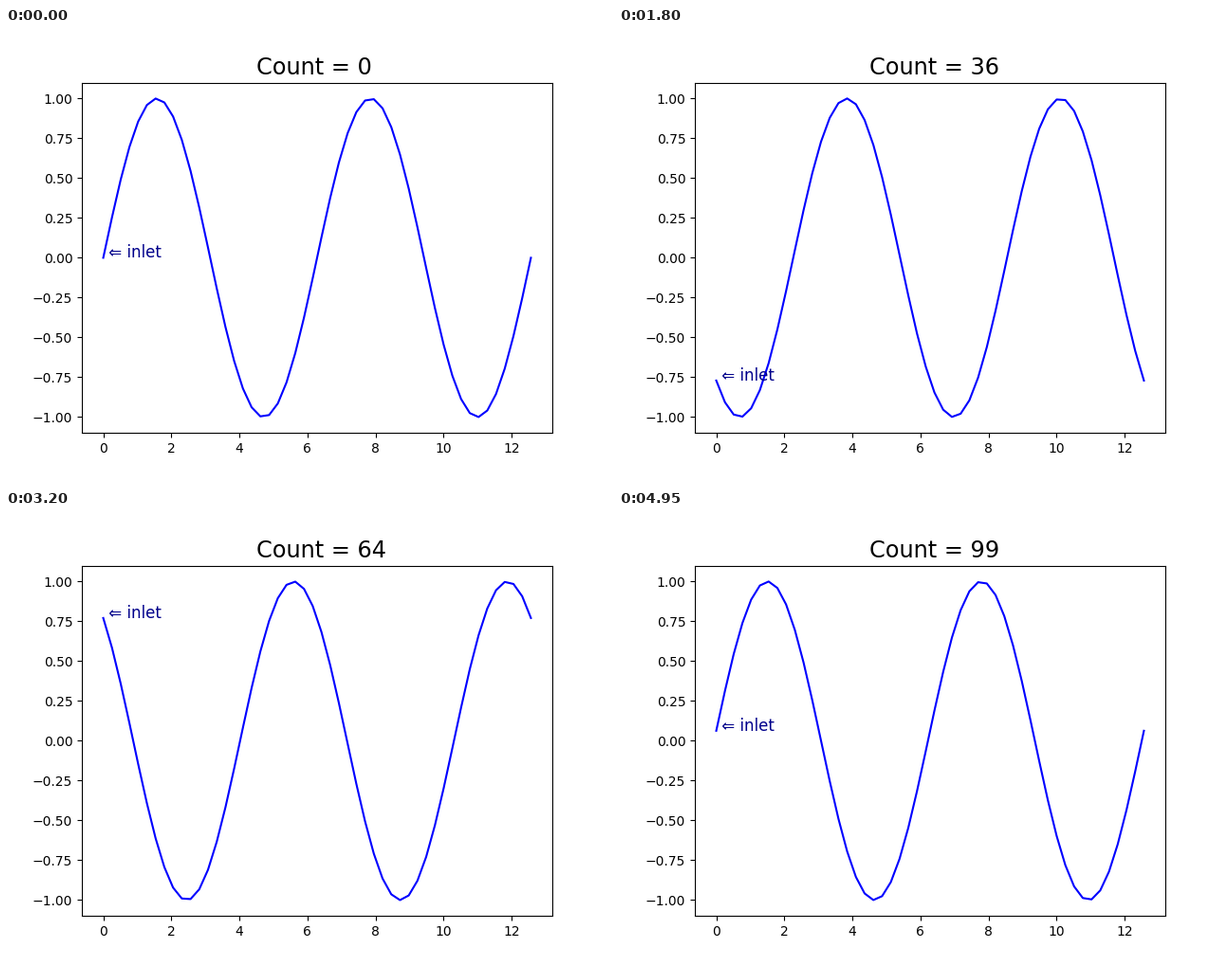
Write a matplotlib script that moves like this. It is 640 px wide and 480 px high and loops after 5000 ms.

```python
import numpy as np
import matplotlib.pyplot as plt
from matplotlib.animation import FuncAnimation

FRAMES = 100
INTERVAL = 50  # ms

fig, ax = plt.subplots(figsize=(6.4, 4.8), dpi=100)
x = np.linspace(0, 4 * np.pi, 50)

# The first wave also fixes the axis limits.
wave, = ax.plot(x, np.sin(x), color="b", lw=1.5)
title = ax.set_title("Count = 0", x=0.37, ha="left", fontsize="xx-large")
inlet = ax.text(0, 0, " ⇐ inlet", color="darkblue", fontsize=12)


def update(count):
    y = np.sin(x - 2 * np.pi * count / FRAMES)
    wave.set_ydata(y)
    inlet.set_y(y[0])
    title.set_text(f"Count = {count}")
    return wave, inlet, title


anim = FuncAnimation(fig, update, frames=FRAMES, interval=INTERVAL,
                     repeat=True, repeat_delay=0, blit=False)
plt.show()
```
